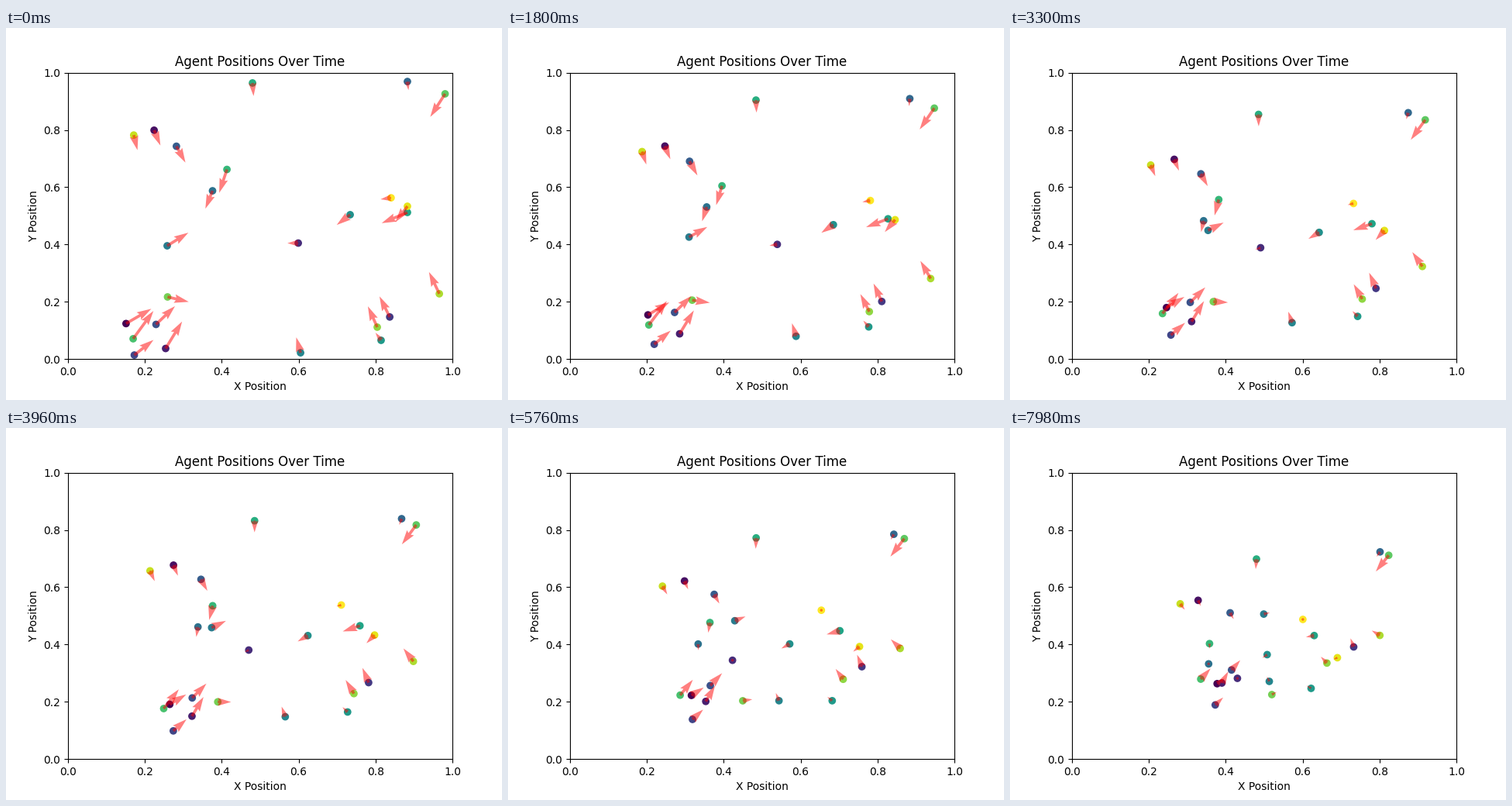
Write a matplotlib script that moves like this. It is 640x480 px and loops after 8 s.

```python
import numpy as np
import matplotlib.pyplot as plt
from matplotlib.animation import FuncAnimation

STEPS = 133      # moves in one loop, 60 ms each
SPEED = 0.002    # distance covered per move

# Each agent: start x, start y, and the two agents it tries to stand between
AGENTS = [
    (.151, .124, 12, 14), (.224, .799, 22, 11), (.254, .037, 15, 14),
    (.599, .405, 9, 19), (.837, .147, 8, 10), (.1725, .014, 21, 9),
    (.229, .121, 21, 15), (.282, .743, 0, 14), (.883, .969, 18, 24),
    (.376, .5875, 6, 0), (.258, .3955, 8, 12), (.605, .022, 22, 13),
    (.734, .504, 3, 17), (.8145, .0655, 12, 11), (.883, .512, 10, 17),
    (.480, .964, 7, 12), (.4135, .662, 17, 2), (.1695, .071, 18, 16),
    (.981, .926, 9, 13), (.259, .217, 13, 20), (.8045, .1115, 7, 24),
    (.966, .228, 18, 16), (.171, .782, 7, 2), (.883, .5335, 21, 5),
    (.8405, .563, 0, 18),
]

start = np.array([agent[:2] for agent in AGENTS])
left, right = np.array([agent[2:] for agent in AGENTS]).T


def gap(pos):
    """Vector from each agent to the midpoint of its two partners."""
    return (pos[left] + pos[right]) / 2 - pos


def move(pos):
    """Walk one step of constant length towards the midpoint."""
    way = gap(pos)
    dist = np.linalg.norm(way, axis=1, keepdims=True)
    return pos + way * SPEED / np.maximum(dist, SPEED)


path = [start]
for _ in range(STEPS):
    path.append(move(path[-1]))

fig, ax = plt.subplots(figsize=(6.4, 4.8), dpi=100)
ax.set(xlim=(0, 1), ylim=(0, 1), xlabel="X Position", ylabel="Y Position",
       title="Agent Positions Over Time")
dots = ax.scatter(*start.T, c=range(len(AGENTS)), cmap="viridis")
arrows = ax.quiver(*start.T, *gap(start).T, color="red", alpha=0.5, scale=10)


def update(frame):
    pos = path[frame // 3]
    dots.set_offsets(pos)
    arrows.set_offsets(pos)
    arrows.set_UVC(*gap(pos).T)
    return dots, arrows


anim = FuncAnimation(fig, update, frames=400, interval=20, repeat=True,
                     repeat_delay=0)
plt.show()
```
